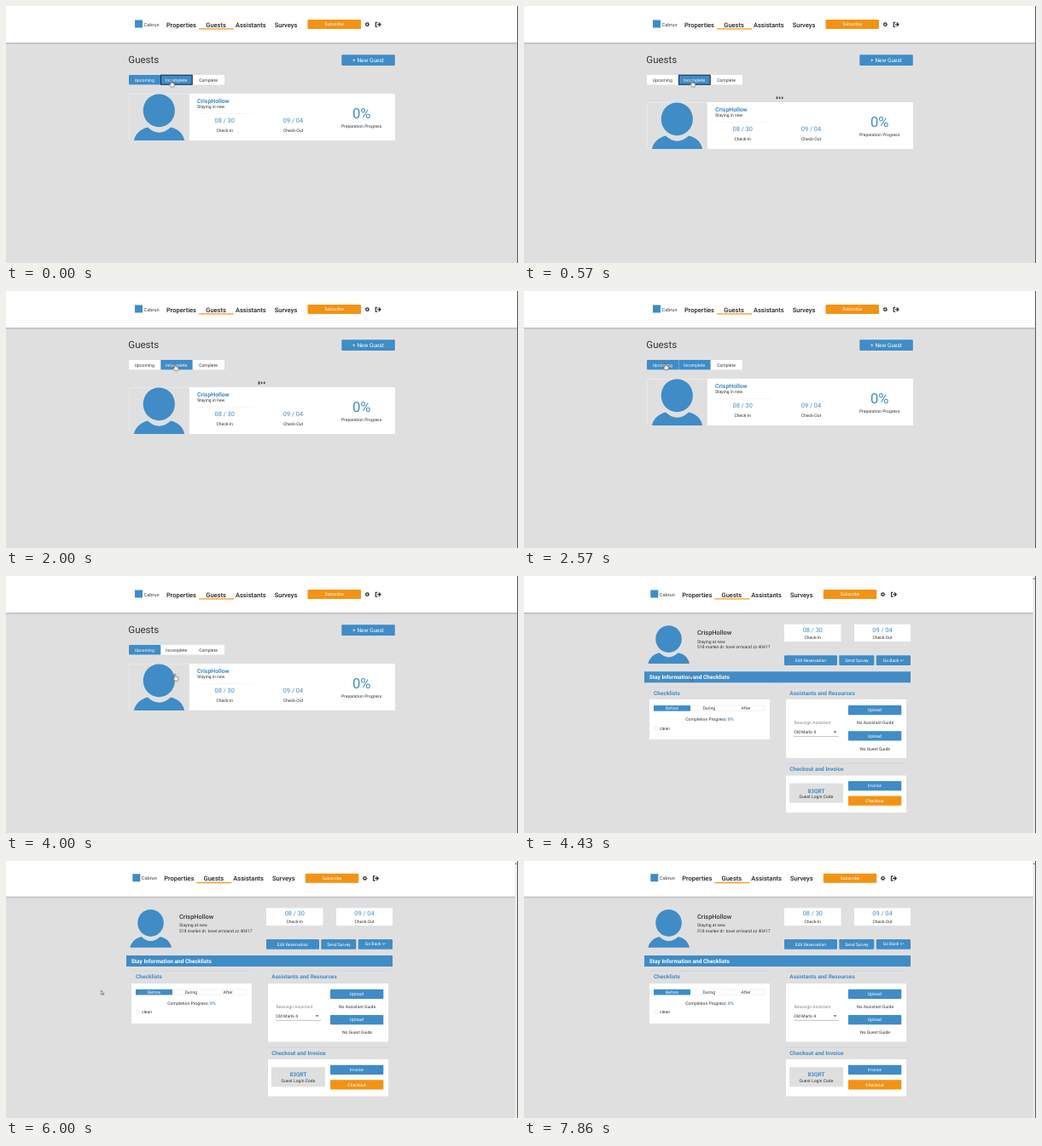
Write an HTML page that moves like this. It is 600 px wide and 302 px high and loops after 8000 ms.

```html
<!DOCTYPE html>
<html lang="en">
<head>
<meta charset="utf-8">
<title>Guest manager</title>
<style>
  html, body { margin: 0; width: 100%; height: 100%; overflow: hidden; background: #e0dfe0; }
  svg { display: block; width: 100%; height: 100%; --blue: #3f8cc7; --orange: #f39315; }
  text { font: 5.05px Roboto, sans-serif; fill: #333; text-rendering: geometricPrecision; }
  .mid { text-anchor: middle; }
  .nav text { font-size: 7.5px; font-weight: 500; fill: #222; }
  .nav .brand { font-size: 5.6px; font-weight: 500; fill: #666; }
  .head { font-size: 6.55px; font-weight: 700; }
  .date { font-size: 7.4px; }
  .blue, text.blue { fill: var(--blue); }
  .orange { fill: var(--orange); }
  .white, text.white, .nav text.white { fill: #fff; }
  .nav text.small { font-size: 5.05px; font-weight: 400; }
  .panel { fill: #fff; filter: drop-shadow(0 .5px .6px #0003); }
  .rule { stroke: #cfcfd1; stroke-width: .6; }

  /* Every timeline shares one 8 s loop; 1% = 80 ms. */
  .list, .detail, .header, .nudge, .tab, .focus, .loader, .card {
    animation: 8s step-end infinite;
  }
  .list { animation-name: list; }
  .detail { animation-name: detail; }
  .header { animation-name: header; }
  .nudge { animation-name: nudge; }
  .card { animation-name: push; }
  .loader { animation-name: loading; }
  .upcoming { animation-name: upcoming; }
  .incomplete { animation-name: incomplete; }
  .complete { animation-name: complete; }
  .focus { animation-name: focus; }
  .loader rect {
    transform-box: fill-box; transform-origin: center;
    animation: pulse .8s ease-in-out infinite alternate;
  }
  .loader rect:nth-child(2) { animation-delay: -.4s; }
  .loader rect:nth-child(3) { animation-delay: -.2s; }
  .cursor { animation: cursor 8s ease-in-out infinite; }

  @keyframes list { 0% { visibility: visible } 53.6%, 100% { visibility: hidden } }
  @keyframes detail { 0% { visibility: hidden } 53.6%, 100% { visibility: visible } }
  @keyframes header {
    0% { transform: none }
    53.6% { transform: translate(-2.7px, 0) }
    73.2%, 100% { transform: translate(-2.7px, -1.3px) }
  }
  @keyframes nudge { 0% { transform: translateY(1.3px) } 73.2%, 100% { transform: none } }
  @keyframes push {
    0%, 10%, 20%, 30%, 41%, 100% { transform: none }
    3.5%, 12.5%, 25%, 33.9% { transform: translateY(10px) }
  }
  @keyframes loading {
    0%, 10%, 20%, 30%, 41%, 100% { visibility: hidden }
    3.5%, 12.5%, 25%, 33.9% { visibility: visible }
  }
  @keyframes upcoming {
    0%, 30.4% { visibility: visible }
    3.5% { visibility: hidden }
    53.6%, 100% { visibility: hidden }
  }
  @keyframes incomplete {
    0%, 24% { visibility: visible }
    10.6%, 33.9%, 100% { visibility: hidden }
  }
  @keyframes complete {
    0%, 24%, 100% { visibility: hidden }
    10.6% { visibility: visible }
  }
  @keyframes focus { 0% { visibility: visible } 10.6%, 100% { visibility: hidden } }
  @keyframes pulse { from { transform: scaleY(1) } to { transform: scaleY(.45) } }
  @keyframes cursor {
    0%, 6% { transform: translate(193.5px, 87.5px) }
    11.5%, 20% { transform: translate(230px, 85.5px) }
    24.5%, 28% { transform: translate(198px, 86px) }
    31.5%, 38% { transform: translate(165.5px, 85px) }
    45%, 54% { transform: translate(198px, 115.5px) }
    64%, 66% { transform: translate(119.5px, 162.5px) }
    70% { transform: translate(113px, 157px) }
    75% { transform: translate(111.5px, 152px) }
    82%, 99.99% { transform: translate(-12px, 150px) }
    100% { transform: translate(193.5px, 87.5px) }
  }
</style>
</head>
<body>
<svg viewBox="0 0 600 302">
  <defs>
    <g id="avatar" class="blue">
      <ellipse cx="179.3" cy="122.8" rx="18.6" ry="19.4"/>
      <path d="M150 158C151 150 159 144 166 142.500Q179.500 155 193 142.500C201 144 208 150 209 158Z"/>
    </g>
  </defs>
  <rect width="600" height="302" fill="#e0dfe0"/>

  <g class="header nav">
    <rect x="-5" y="-5" width="612" height="48" fill="#fff"/>
    <rect x="-5" y="43" width="612" height="1" fill="#b9b9bb"/>
    <rect x="-5" y="44" width="612" height="1.500" fill="#d2d1d3"/>
    <rect class="blue" x="151" y="16.500" width="9" height="9"/>
    <text class="brand" x="161.500" y="23.700">Cabrun</text>
    <text x="188" y="24.600">Properties</text>
    <text x="234.300" y="24.600">Guests</text>
    <text x="269" y="24.600">Assistants</text>
    <text x="314.700" y="24.600">Surveys</text>
    <rect class="orange" x="226" y="26.300" width="41" height="1.200"/>
    <rect class="orange" x="353.500" y="16" width="62.500" height="11" rx="1"/>
    <text class="mid white small" x="384.700" y="23.300">Subscribe</text>
    <g fill="none" stroke="#222">
      <circle cx="423.300" cy="21.600" r="1.600" stroke-width="1.100"/>
      <circle cx="423.300" cy="21.600" r="2.300" stroke-width=".8" stroke-dasharray=".9"/>
      <path d="M435.300 19.200H433.200V24.200H435.300M434.800 21.700H438.800M436.800 19.500L439 21.700L436.800 23.900" stroke-width="1.100"/>
    </g>
  </g>

  <g class="list">
    <text x="143.300" y="67.200" style="font-size:11.5px">Guests</text>
    <rect class="blue" x="393.300" y="57.300" width="62.500" height="12.700" rx="1"/>
    <text class="mid white" x="424.500" y="66" style="font-size:6.5px">+ New Guest</text>

    <rect x="144" y="81" width="112" height="11.500" rx="1" fill="#fff"/>
    <g class="mid">
      <text x="162.300" y="88.500">Upcoming</text>
      <text x="199.700" y="88.500">Incomplete</text>
      <text x="237" y="88.500">Complete</text>
    </g>
    <g class="mid tab upcoming">
      <rect class="blue" x="144" y="81" width="37.300" height="11.500" rx="1"/>
      <text class="white" x="162.300" y="88.500">Upcoming</text>
    </g>
    <g class="mid tab incomplete">
      <rect class="blue" x="181.300" y="81" width="37.300" height="11.500"/>
      <text class="white" x="199.700" y="88.500">Incomplete</text>
    </g>
    <g class="mid tab complete">
      <rect class="blue" x="218.600" y="81" width="37.400" height="11.500" rx="1"/>
      <text class="white" x="237" y="88.500">Complete</text>
    </g>
    <rect class="focus" x="181.500" y="81.200" width="36.600" height="11.100" fill="none" stroke="#1b2a3a"/>

    <g class="loader" fill="#222">
      <rect x="295.700" y="105.700" width="1.600" height="4.600"/>
      <rect x="298.800" y="105.700" width="1.600" height="4.600"/>
      <rect x="301.900" y="105.700" width="1.600" height="4.600"/>
    </g>

    <g class="card">
      <rect x="144" y="103" width="312" height="55.300" rx="1" class="panel"/>
      <rect x="144.300" y="103.300" width="70.500" height="54.700" fill="#e0dfe0"/>
      <use href="#avatar"/>
      <text class="head blue" x="224" y="114.200" style="font-size:6.9px">CrispHollow</text>
      <text x="224" y="120.300">Staying in new</text>
      <path class="rule" d="M224 126.300H290" opacity=".35"/>
      <g class="mid">
        <text class="date blue" x="256.200" y="137.300">08 / 30</text>
        <text x="256.200" y="147.700">Check-In</text>
        <text class="date blue" x="336.500" y="137.300">09 / 04</text>
        <text x="336.500" y="147.700">Check-Out</text>
        <text class="blue" x="416.800" y="132.300" style="font-size:16.6px">0%</text>
        <text x="416.600" y="142.700">Preparation Progress</text>
      </g>
    </g>
  </g>

  <g class="detail"><g class="nudge">
    <use href="#avatar" transform="translate(22.5 -27.9) scale(.82)"/>
    <text x="203" y="67.700" style="font-size:7.4px;font-weight:500">CrispHollow</text>
    <text x="203" y="77.300">Staying at new</text>
    <text x="203" y="83.500">518 marlen dr. tovel orrisand zz 40417</text>

    <rect x="305" y="55.300" width="66.500" height="20.500" fill="#fff"/>
    <rect x="387" y="55.300" width="66" height="20.500" fill="#fff"/>
    <g class="mid">
      <text class="date blue" x="338.300" y="64.300">08 / 30</text>
      <text x="338.300" y="72.800">Check-In</text>
      <text class="date blue" x="420" y="64.300">09 / 04</text>
      <text x="420" y="72.800">Check-Out</text>
    </g>

    <g class="blue">
      <rect x="305" y="92" width="62" height="11.700" rx="1"/>
      <rect x="369.300" y="92" width="41" height="11.700" rx="1"/>
      <rect x="412.800" y="92" width="40.200" height="11.700" rx="1"/>
      <rect x="141" y="111" width="312" height="13"/>
    </g>
    <g class="mid">
      <text class="white" x="336" y="99.600">Edit Reservation</text>
      <text class="white" x="390" y="99.600">Send Survey</text>
      <text class="white" x="432.800" y="99.400">Go Back ↩</text>
    </g>
    <text class="head white" x="146.800" y="119.800">Stay Information and Checklists</text>

    <path class="rule" d="M147 129.300H288M307 129.300H448.500M307 218.700H448.500"/>
    <text class="head blue" x="152" y="138.400">Checklists</text>
    <text class="head blue" x="311.300" y="138.400">Assistants and Resources</text>
    <text class="head blue" x="311.300" y="227.500">Checkout and Invoice</text>
    <rect class="panel" x="147" y="143.700" width="141" height="47.300"/>
    <rect class="panel" x="307" y="143.700" width="141.300" height="69"/>
    <rect class="panel" x="307" y="233" width="141.300" height="43.700"/>

    <path class="rule" d="M152 151H281.300V157.200H152" fill="none" opacity=".5"/>
    <rect class="blue" x="152" y="150.800" width="43" height="6.600"/>
    <g class="mid">
      <text class="white" x="173.500" y="156">Before</text>
      <text x="216.800" y="156">During</text>
      <text x="260" y="156">After</text>
      <text x="217.500" y="168.600">Completion Progress: <tspan class="blue" font-weight="700">0%</tspan></text>
    </g>
    <circle cx="154.600" cy="177.500" r="2.200" fill="#fff" stroke="#ddd" stroke-width=".6"/>
    <text x="159" y="179.300">clean</text>

    <text x="316.500" y="172.500" style="fill:#888">Reassign Assistant</text>
    <text x="316.200" y="183.500">Old Marlo 4</text>
    <path d="M362.700 181.200H366.500L364.600 183.200Z" fill="#555"/>
    <path d="M316 187.300H369" stroke="#999" stroke-width=".6"/>
    <g class="blue">
      <rect x="380" y="150.800" width="62.300" height="11.200" rx="1"/>
      <rect x="380" y="181" width="62.300" height="11.200" rx="1"/>
      <rect x="380" y="239.700" width="62.300" height="11.300" rx="1"/>
    </g>
    <rect class="orange" x="380" y="257.300" width="62.300" height="11.200" rx="1"/>
    <rect x="311" y="242.300" width="63" height="23" fill="#dfdfe0"/>
    <g class="mid">
      <text class="white" x="411" y="158.200">Upload</text>
      <text x="411.500" y="173">No Assistant Guide</text>
      <text class="white" x="411" y="188.400">Upload</text>
      <text x="411.500" y="203.400">No Guest Guide</text>
      <text class="white" x="411" y="247.100">Invoice</text>
      <text class="white" x="411" y="264.700">Checkout</text>
      <text class="head blue" x="342.500" y="253.300">83QRT</text>
      <text x="342.500" y="260">Guest Login Code</text>
    </g>
  </g>
    <rect x="596.500" width="2.500" height="302" fill="#ececec"/>
    <path d="M596.400 3.800L597.700 2.200L599 3.800Z" fill="#555"/>
  </g>

  <rect x="599" width="1" height="302" fill="#55555a"/>

  <g class="cursor" fill="#fff" stroke="#222" stroke-width=".5" stroke-linejoin="round">
    <path class="list" d="M-.7 0H.7V2.800L4 3.600V6L3 7.800H0L-2.400 4.800L-1.800 4L-.7 4.800Z"/>
    <path class="detail" d="M0 0V5L1.200 4L2 5.700L2.700 5.400L1.900 3.700H3.400Z"/>
  </g>
</svg>
</body>
</html>
```
